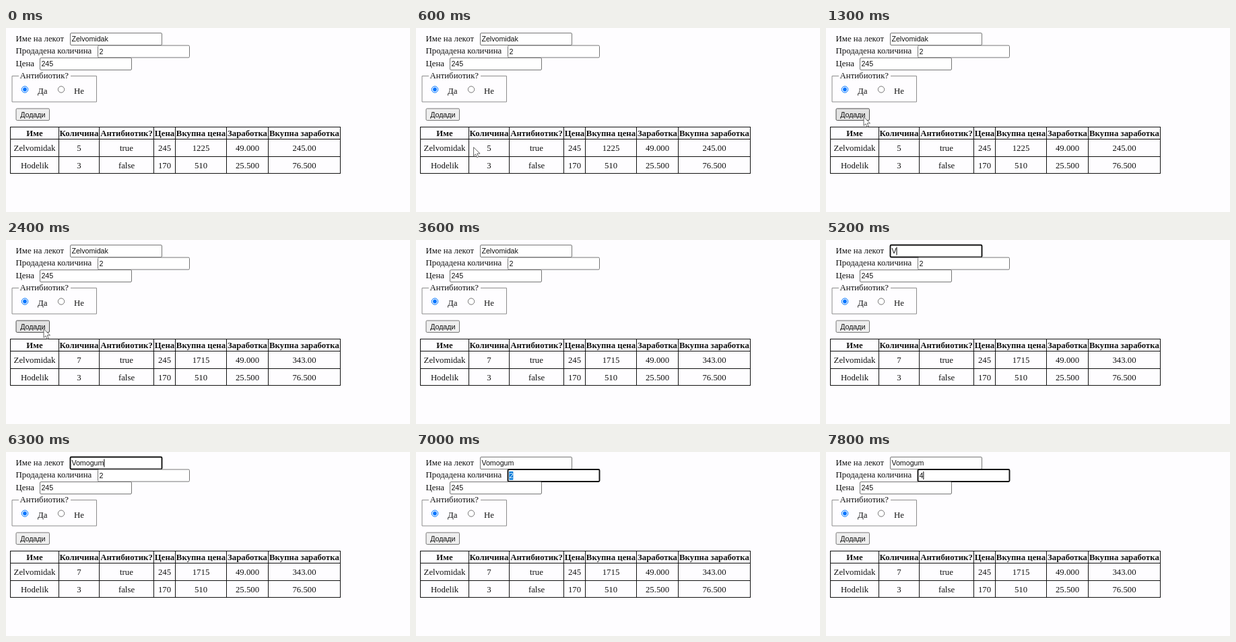
An HTML page for the animation above (8 s loop, 600 by 274 pixels).

```html
<!DOCTYPE html>
<html lang="mk">
<head>
<meta charset="utf-8">
<style>
html, body { margin: 0; width: 100%; height: 100%; overflow: hidden; background: #fefdff; }
svg { display: block; }
text { font: 12.8px "Liberation Serif", "Times New Roman", serif; fill: #111; white-space: pre; }
.ui { font: 10.67px "Liberation Sans", Arial, sans-serif; }
.bold { font-weight: bold; }
.mid { text-anchor: middle; }
</style>
</head>
<body>
<svg id="stage" width="600" height="274"></svg>
<script>
const LOOP = 8000;
const stage = document.getElementById('stage');

function add(tag, attrs, content = '') {
  const el = document.createElementNS('http://www.w3.org/2000/svg', tag);
  for (const key in attrs) el.setAttribute(key, attrs[key]);
  el.textContent = content;
  return stage.appendChild(el);
}
const label = (x, y, content, cls = '') => add('text', { x, y, class: cls }, content);
const line = (d, stroke) => add('path', { d, stroke, fill: 'none' });
const show = (el, on) => el.setAttribute('visibility', on ? 'visible' : 'hidden');

function addField(caption, x, y) {
  label(14.6, y + 12.6, caption);
  const box = add('rect', { x: x + .5, y: y + .5, width: 136, height: 18, rx: 1.5, fill: '#fff' });
  const mark = add('rect', { x: x + 2.4, y: y + 3.5, height: 12.5, fill: '#0078d7' });
  const text = label(x + 2.4, y + 13.2, '', 'ui');
  const caret = add('rect', { y: y + 3.5, width: 1, height: 12, fill: '#000' });
  return { x, box, mark, text, caret };
}

function setField(field, value, focused = false, selected = false) {
  const { x, box, mark, text, caret } = field;
  text.textContent = value;
  text.style.fill = selected ? '#fff' : '#111';
  box.setAttribute('stroke', focused ? '#101010' : '#767676');
  box.setAttribute('stroke-width', focused ? 1.9 : 1);
  const width = text.getComputedTextLength();
  mark.setAttribute('width', width);
  caret.setAttribute('x', x + 2.4 + width);
  show(mark, selected);
  show(caret, focused && !selected);
}

// Form
const nameField = addField('Име на лекот', 95, 7);
const countField = addField('Продадена количина', 136, 25.5);
const priceField = addField('Цена', 50, 44);

line('M19 71.5H9V110H134.5V71.5H96', '#8c8c8c');
label(20.6, 75, 'Антибиотик?');
add('circle', { cx: 28, cy: 91.5, r: 4.7, fill: '#fff', stroke: '#0075ff' });
add('circle', { cx: 28, cy: 91.5, r: 2.9, fill: '#0075ff' });
add('circle', { cx: 82, cy: 91.5, r: 4.7, fill: '#fff', stroke: '#767676' });
label(47, 98, 'Да');
label(101, 98, 'Не');
const button = add('rect', { x: 15, y: 120, width: 49.5, height: 17.5, rx: 1.5, stroke: '#767676' });
label(39.8, 132.8, 'Додади', 'ui mid');

// Table
const columns = [6.5, 78.5, 138.5, 219.5, 251.5, 327.5, 389.5, 496.5];
const rows = [147.5, 165.5, 191.5, 216.5];
line(columns.map(x => `M${x} 147V217`).join('') + rows.map(y => `M6 ${y}H497`).join(''), '#111');
const addRow = (y, cells, cls) => cells.map((cell, i) =>
  label((columns[i] + columns[i + 1]) / 2, y, cell, cls));
addRow(161, ['Име', 'Количина', 'Антибиотик?', 'Цена', 'Вкупна цена', 'Заработка', 'Вкупна заработка'], 'mid bold');
const firstRow = addRow(183, ['Zelvomidak', '5', 'true', '245', '1225', '49.000', '245.00'], 'mid');
addRow(208.5, ['Hodelik', '3', 'false', '170', '510', '25.500', '76.500'], 'mid');

const cursor = add('path', {
  d: 'M0 0V13L3 10.2 5 15 7.3 14 5.2 9.4H9.5Z', fill: '#fff', stroke: '#555', 'stroke-width': .9
});

function moveCursor(t, start, end, from, to) {
  const p = Math.min(1, Math.max(0, (t - start) / (end - start)));
  const ease = p * p * (3 - 2 * p);
  const [x, y] = from.map((v, i) => v + (to[i] - v) * ease);
  cursor.setAttribute('transform', `translate(${x} ${y})`);
}

const typed = 'Vomogum';
const keyTimes = [5200, 5500, 5600, 5700, 5900, 6000, 6100];

function draw(t) {
  const sold = t < 2400 ? 5 : 7;
  firstRow[1].textContent = sold;
  firstRow[4].textContent = sold * 245;
  firstRow[6].textContent = (sold * 49).toFixed(2);

  const letters = keyTimes.filter(k => t >= k).length;
  setField(nameField, letters ? typed.slice(0, letters) : 'Zelvomidak',
    t >= 4700 && t < 6700, t >= 4700 && !letters);
  setField(countField, t < 7500 ? '2' : '4', t >= 6700, t >= 6700 && t < 7500);
  setField(priceField, '245');

  const rest = [56, 132.5];
  if (t < 3000) moveCursor(t, 100, 900, [150, 276], rest);
  else moveCursor(t, 3800, 4500, rest, [110, -18]);
  show(cursor, (t >= 100 && t < 2700) || (t >= 3800 && t < 4500));

  const pressed = t >= 2300 && t < 2400;
  const hovered = (t >= 800 && t < 2700) || (t >= 3800 && t < 3900);
  button.setAttribute('fill', pressed ? '#f5f5f5' : hovered ? '#e3e3e3' : '#efefef');
  button.setAttribute('stroke', hovered ? '#4f4f4f' : '#767676');
}

function tick() {
  draw(performance.now() % LOOP);
  requestAnimationFrame(tick);
}
tick();
</script>
</body>
</html>
```
